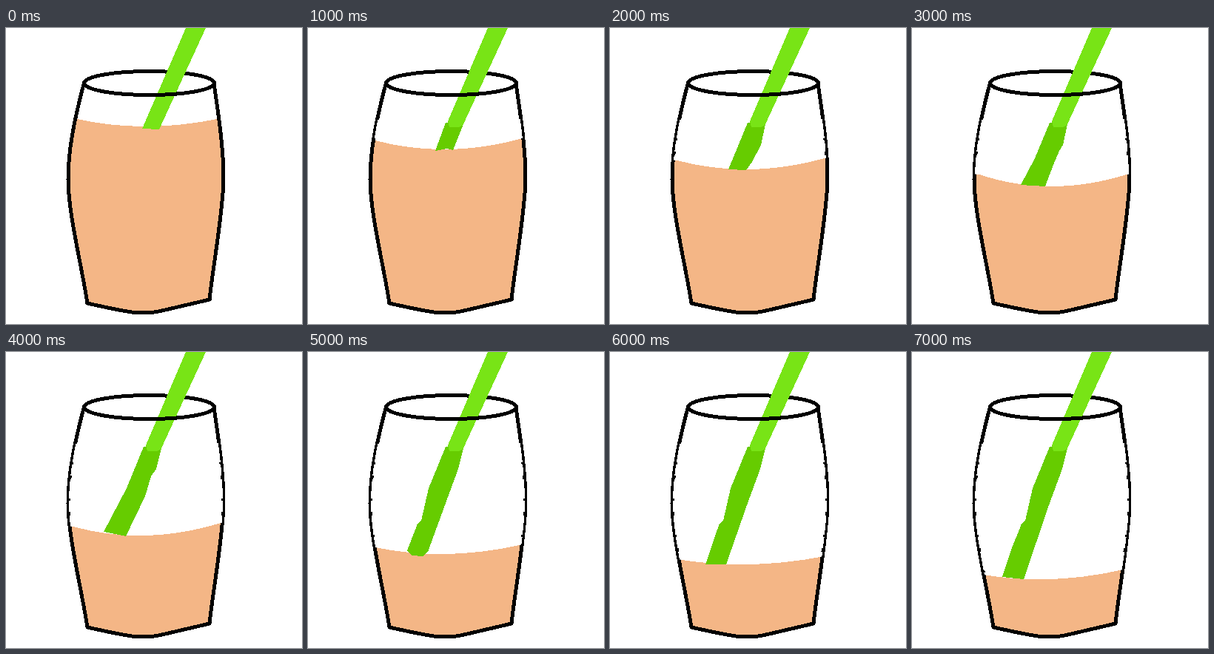
Recreate the animation shown at these times as an HTML page. Size 400x400 px, loop 8000 ms.

```html
<!DOCTYPE html>
<html lang="en">
<head>
<meta charset="utf-8">
<title>Emptying glass</title>
<style>
  html, body { margin: 0; width: 100%; height: 100%; overflow: hidden; background: #fff; }
  svg { display: block; shape-rendering: crispEdges; }
  .line { fill: none; stroke: #000; stroke-width: 5; stroke-linecap: round; stroke-linejoin: round; }
  .wear { fill: none; stroke: #fff; stroke-width: 3; stroke-dasharray: 26 3 15 5; }
</style>
</head>
<body>
<svg width="400" height="400" viewBox="0 0 400 400">
  <defs>
    <path id="left" d="M105 76C92 125 84 165 84 205C84 250 103 325 110 372"/>
    <path id="right" d="M281 75C286 110 294 160 294 202C294 245 280 320 275 367"/>
    <clipPath id="inside">
      <path d="M105 76C92 125 84 165 84 205C84 250 103 325 110 372Q150 381 170 384Q192 387 215 381L275 367C280 320 294 245 294 202C294 160 286 110 281 75Z"/>
    </clipPath>
    <clipPath id="emptied"><path id="air"/></clipPath>
  </defs>
  <g clip-path="url(#inside)"><path id="liquid" fill="#f4b686"/></g>
  <g class="line">
    <use href="#left"/>
    <use href="#right"/>
    <path d="M110 372Q150 381 170 384Q192 387 215 381L275 367"/>
  </g>
  <!-- The falling liquid leaves the inner edge of the wall thin and ragged. -->
  <g class="wear" clip-path="url(#emptied)">
    <use href="#left" x="2.5"/>
    <use href="#right" x="-2.5"/>
  </g>
  <path class="line" d="M105.5 74.5A88 16 0 0 1 281.5 74.5"/>
  <path id="wetStraw" fill="#66cc00"/>
  <path id="dryStraw" fill="#78e416"/>
  <path class="line" d="M105.5 74.5A88 16 0 0 0 281.5 74.5"/>
</svg>
<script>
const STEP = 1000;

// Height of the surface at the left wall, the middle and the right wall.
const levels = [
  [122, 133, 122], [152, 164, 149], [179, 191, 176], [198, 214, 198],
  [236, 248, 231], [264, 273, 260], [280, 287, 276], [300, 307, 293]
];

// The wet part of the straw, from its right shoulder round to its left edge.
const longEdge = 'L203 158L185 207';
const raggedEdge = 'L145 240L148 232L153 228L163 184L168 172Z';
const wetStraw = [
  '',
  'L196 165L188 163L172 166Z',
  'L204 158L192 181L184 192L160 191Z',
  'L204 158L199 166L191 185L180 214L147 212L166 176Z',
  'L203 158L196 168L188 195L162 249L132 243L163 184L170 167Z',
  longEdge + 'L162 270L155 276L140 275L134 268' + raggedEdge,
  longEdge + 'L157 287L129 287' + raggedEdge,
  longEdge + 'L151 307L122 304L136 262' + raggedEdge
].map(d => d && 'M186 128L210 130' + d);

const dryStraw = 'M243 0H270L207 137L184 136Z';
const shortStraw = 'M243 0H270L210 130Q207 136 191 134L189 126Z';

function setPath(id, d) {
  document.getElementById(id).setAttribute('d', d);
}

function draw(step) {
  const [l, mid, r] = levels[step];
  const dip = 2 * mid - (l + r) / 2;
  const surface = `M70 ${l - 2}L91 ${l}Q187 ${dip} 290 ${r}L310 ${r - 2}`;
  setPath('liquid', surface + 'V400H70Z');
  setPath('air', step ? surface + 'V121H70Z' : '');
  setPath('wetStraw', wetStraw[step]);
  setPath('dryStraw', step ? shortStraw : dryStraw);
}

function tick() {
  draw(Math.floor(performance.now() / STEP) % levels.length);
  requestAnimationFrame(tick);
}
tick();
</script>
</body>
</html>
```
